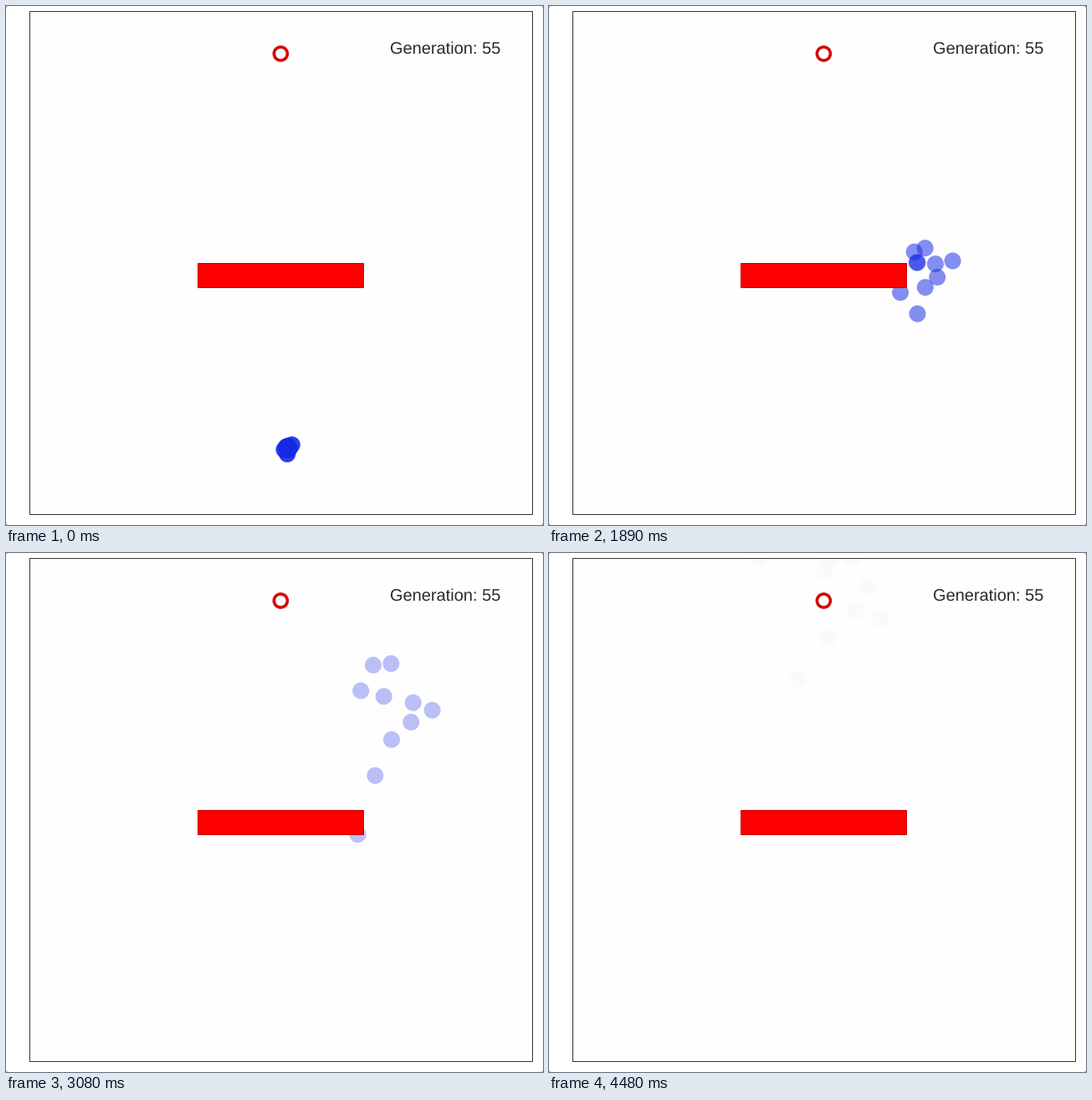
Animation of 642x620 px, one loop 4550 ms. Source, as a matplotlib script:

```python
import numpy as np
import matplotlib.pyplot as plt
from matplotlib.animation import FuncAnimation
from matplotlib.patches import Circle, FancyBboxPatch, Rectangle

plt.rcParams["text.hinting"] = "none"

W, H, DPI = 642, 620, 100
FRAMES, STEP, SUB = 65, 70, 10
LOOP = FRAMES * STEP
PX = 72 / DPI  # points per pixel
TOP = 7
DOT = (22 / 255, 42 / 255, 229 / 255)

# Course of the whole swarm: time, x, y
COURSE = np.array([
    (0, 337, 528), (770, 381, 453), (1470, 434, 379), (2240, 459, 260),
    (2800, 475, 196), (3080, 461, 180), (3850, 387, 116), (4480, 333, 28),
], float)

# How each dot strays from it: drift x, y (linear) and pull x, y (quadratic)
STRAY = [
    (-10, 111, -18, -5), (0, 31, 0, 28), (29, 9, 0, 23), (75, -65, -18, 93),
    (12, -28, 25, 33), (-30, -22, 23, 14), (20, -8, -82, -14),
    (-25, -14, -3, -54), (0, -34, -1, -32), (-70, 25, 20, 65),
]


def hermite(t, knots, pts):
    """Smooth curve through pts, holding the last one."""
    slope = np.gradient(pts, knots, axis=0)
    t = np.clip(t, knots[0], knots[-1])
    i = np.clip(np.searchsorted(knots, t, side="right") - 1, 0, len(knots) - 2)
    h = (knots[i + 1] - knots[i])[:, None]
    s = (t - knots[i])[:, None] / h
    return ((1 + 2 * s) * (1 - s) ** 2 * pts[i]
            + s * (1 - s) ** 2 * h * slope[i]
            + s * s * (3 - 2 * s) * pts[i + 1]
            + s * s * (s - 1) * h * slope[i + 1])


def stop_on_hit(track):
    """Freeze a dot where it meets the top wall or the obstacle."""
    x, y = track.T
    hit = (y <= TOP) | ((x > 229) & (x < 428) & (y > 307) & (y < 337))
    if hit.any():
        first = hit.argmax()
        track[first:] = track[first]
    return track


time = np.arange(FRAMES * SUB) * STEP / SUB
swarm = hermite(time, COURSE[:, 0], COURSE[:, 1:])
spread = np.hypot(time, 250)[:, None] / 3850
tracks = []
for stray in STRAY:
    drift, pull = np.array(stray[:2]), np.array(stray[2:])
    track = swarm + drift * spread + pull * spread ** 2
    tracks.append(stop_on_hit(track)[::SUB])

fig = plt.figure(figsize=(W / DPI, H / DPI), dpi=DPI, facecolor="#a0a0a0")
ax = fig.add_axes([0, 0, 1, 1])
ax.set_xlim(0, W)
ax.set_ylim(H, 0)
ax.axis("off")


def box(x0, y0, x1, y1, **style):
    patch = Rectangle((x0, y0), x1 - x0, y1 - y0, snap=False, **style)
    return ax.add_patch(patch)


ax.add_patch(FancyBboxPatch((0, 0), W, H, boxstyle="round,pad=0,rounding_size=3",
                            fc="white", ec="none", zorder=0))
arena = box(29, TOP, 629, 607, fc="#fefefe", ec="none", zorder=1)

dots = []
for track in tracks:
    dot = ax.add_patch(Circle(track[0], 10, fc=DOT, ec="none", zorder=2))
    dot.set_clip_path(arena)
    dots.append(dot)

box(229.5, 307.5, 427.5, 336.5, fc="#ff0000", ec="#c80000", lw=PX, zorder=3)
ax.add_patch(Circle((328.4, 57), 8, fc="white", ec="#d60808", lw=3.6 * PX, zorder=3))
box(28.5, 6.5, 629.5, 607.5, fc="none", ec="#333333", lw=PX, zorder=4)
ax.text(459, 57, "Generation: 55", family="Liberation Sans", size=20 * PX,
        color="#2a2a2a", ha="left", va="baseline", zorder=4)


def update(n):
    alpha = 0.9 * (1 - n * STEP / LOOP)
    for dot, track in zip(dots, tracks):
        dot.center = track[n]
        dot.set_alpha(alpha)
    return dots


anim = FuncAnimation(fig, update, frames=FRAMES, interval=STEP,
                     repeat=True, repeat_delay=0, blit=False)
plt.show()
```
